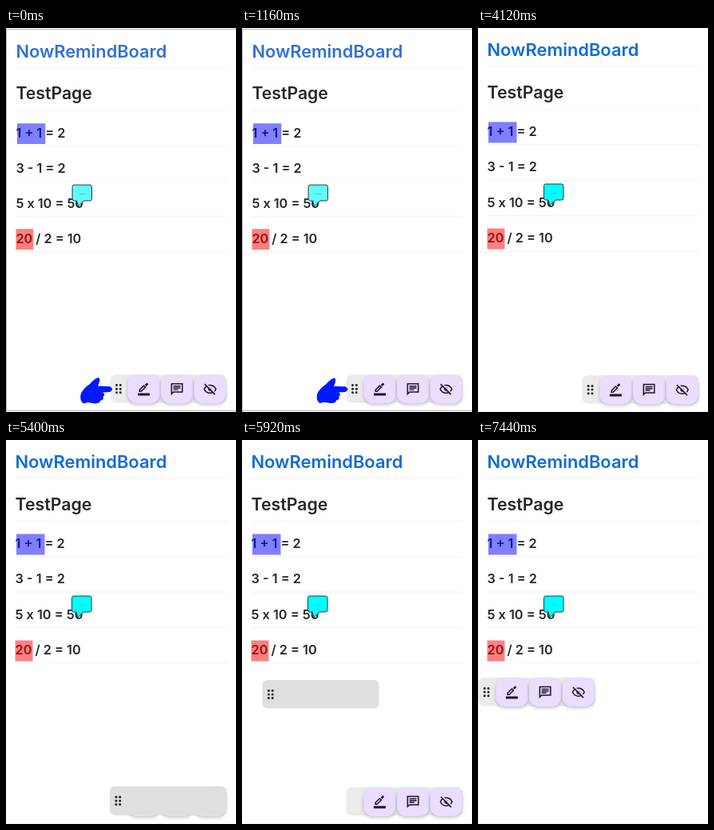
An HTML page for the animation above (8000 ms loop, 288x480 px).

```html
<!DOCTYPE html>
<html lang="en">
<head>
<meta charset="utf-8">
<title>Memory sheet toolbar</title>
<style>
  html, body { margin: 0; width: 100%; height: 100%; overflow: hidden; background: #fff; }
  svg { display: block; width: 288px; height: 480px; }
  text { font: 600 16.3px Inter, "Open Sans", sans-serif; fill: #24282e; white-space: pre; }
  #title { font-size: 21.9px; fill: #0f6bd9; }
  #heading { font-size: 21.3px; }
  #bubble { fill: #0ff; stroke: #1c3c40; }
  #dots { font-size: 8px; font-weight: 400; fill: #356; }
  .soft #title { fill: #3470d6; }
  .soft #bubble { fill: #62fbfb; }
  .rule { stroke: #f3f3f3; }
  .button { fill: #eaddff; filter: drop-shadow(0 2px 2px rgba(60, 50, 90, .3)); }
  .icon { fill: none; stroke: #1d1428; stroke-width: 1.5; }
  .icon .solid { fill: #1d1428; stroke: none; }
  .icon .gap { stroke: #eaddff; }
</style>
</head>
<body>
<svg id="stage" viewBox="0 0 288 480">
  <defs>
    <g id="grip" fill="#222"></g>
  </defs>
  <g id="page">
    <g id="rules"></g>
    <text id="title" x="11.5" y="34.5">NowRemindBoard</text>
    <text id="heading" x="11.5" y="87.5">TestPage</text>
    <g id="lines"></g>
    <path fill="#00f" fill-opacity=".5" d="M13 117.500h35.500v26H13z"/>
    <path fill="#f00" fill-opacity=".5" d="M11.500 250.500h22v26h-22z"/>
    <path id="bubble" d="M84.500 195h20q2.500 0 2.500 2.500v15q0 2.500-2.500 2.500h-7.500l-7 7-2-7h-3.500q-2 0-2-2.500v-15q0-2.500 2-2.500z"/>
    <text id="dots" x="95" y="206.500" text-anchor="middle">...</text>
    <g id="bar">
      <rect x="130.500" y="434" width="146" height="35.500" rx="7" fill="#ebebeb"/>
      <g id="buttons"></g>
      <use id="barGrip" href="#grip" x="130" y="434"/>
    </g>
  </g>
  <path id="frame" d="M.5 480V1.500H288M0 478.500h288" fill="none" stroke="#b5b5b5"/>
  <path id="hand" fill="#0019ff" d="M93.500 458Q96 451 105 445 112 437 116 437 119 439 115 447.500L130 448Q136 451.500 130 455L121 455.500Q125 458 121.500 461 123 465 118.500 465.500 118 469 112 469.500L102 468 97 469.500Q92 466 93.500 458Z"/>
  <g id="ghost">
    <rect width="146" height="35.500" rx="6" fill="#dfdfdf"/>
    <use href="#grip" x="-.3" y="-.2"/>
  </g>
</svg>
<script>
const LOOP = 8000, CUT = 1960, POP = 480, DRAG = 5400, DROP = 7360;
const get = id => document.getElementById(id);
const repeat = (n, make) => Array.from({ length: n }, (_, i) => make(i)).join("");

// Key points of the drag: time, left, top
const dragKeys = [
  [DRAG, 130, 433], [5920, 25.5, 300], [6240, 11, 295.5], [7000, 8.5, 295], [7240, 1, 297]
];

// Icons are drawn around the centre of their button
const pencil = `<path d="M-5.3 3v-2L0-4.3 2-2.3-3.3 3z"/>
  <path class="solid" d="M1.200-5.400 4-8 5.800-6.200 3.200-3.500zM-7.500 5.200h15v3h-15z"/>`;
const chat = `<path d="M-6.75 6V-6.75H6.75V3.75H-4.5zM-4.5-3.75h9m-9 2.25h9m-9 2.25h6"/>`;
const hiddenEye = `<path d="M-7.400 0Q-5-5 0-5T7.400 0Q5 5 0 5T-7.400 0z"/>
  <circle class="solid" r="2.400"/>
  <path class="gap" d="M-5-6.700 7.500 5.800"/><path d="M-6.900-6.300 6.200 6.800"/>`;

get("rules").innerHTML =
  repeat(6, i => `<path class="rule" d="M12 ${i ? 57 + i * 44.4 : 47.5}H276"/>`) +
  `<path class="rule" d="M0 479.5H288"/>`;
get("lines").innerHTML = ["1 + 1 = 2", "3 - 1 = 2", "5 x 10 = 50", "20 / 2 = 10"]
  .map((line, i) => `<text x="11.5" y="${135 + i * 44.4}">${line}</text>`).join("");
get("buttons").innerHTML = [pencil, chat, hiddenEye].map((icon, i) =>
  `<g transform="translate(${172.4 + i * 41.7} 452.3)">
    <rect class="button" x="-20" y="-17.8" width="40" height="35.5" rx="11"/>
    <g class="icon">${icon}</g>
  </g>`).join("");
get("grip").innerHTML = repeat(6, i =>
  `<circle cx="${8.2 + i % 2 * 4.8}" cy="${13.4 + (i >> 1) * 4.7}" r="1.5"/>`);

function show(id, on) {
  get(id).style.display = on ? "" : "none";
}

function move(id, transform) {
  get(id).setAttribute("transform", transform);
}

// One large pop, then a slight undershoot that settles
function popScale(t) {
  if (t < 0 || t > 960) return 1;
  return t < 560
    ? 1 + .34 * Math.sin(Math.PI * t / 560)
    : 1 - .03 * Math.sin(Math.PI * (t - 560) / 400);
}

// Eases from one key point to the next and rests on the last
function dragPoint(t) {
  const next = dragKeys.findIndex(key => key[0] > t);
  if (next < 0) return dragKeys.at(-1).slice(1);
  const [t0, ...from] = dragKeys[next - 1], [t1, ...to] = dragKeys[next];
  const u = (t - t0) / (t1 - t0), ease = u * u * (3 - 2 * u);
  return from.map((v, i) => v + (to[i] - v) * ease);
}

function draw(t) {
  const intro = t < CUT, dragging = t >= DRAG && t < DROP;
  get("stage").classList.toggle("soft", intro);
  move("page", intro ? "translate(1 2.7) scale(.995 .992)" : "");
  show("frame", intro);
  show("hand", intro);
  move("hand", `translate(113.5 453.5) scale(${popScale(t - POP)}) translate(-113.5 -453.5)`);
  show("ghost", dragging);
  show("barGrip", !dragging);
  move("bar", t >= DROP ? "translate(-130 -137)" : "");
  if (dragging) move("ghost", `translate(${dragPoint(t)})`);
}

const start = performance.now();
function tick() {
  draw((performance.now() - start) % LOOP);
  requestAnimationFrame(tick);
}
tick();
</script>
</body>
</html>
```
